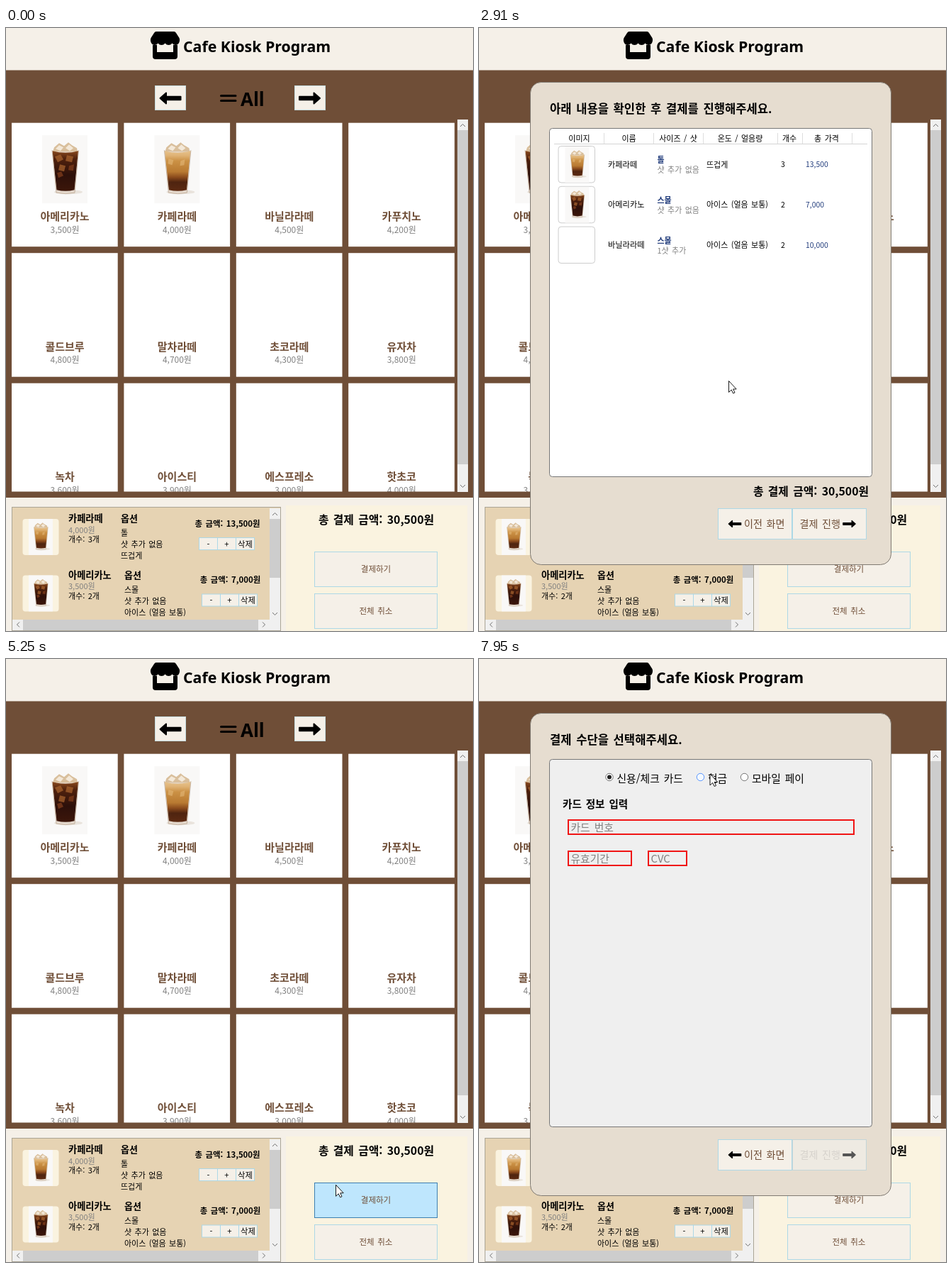
Write an HTML page that moves like this. It is 659x850 px and loops after 8 s.

```html
<!DOCTYPE html>
<html lang="ko">
<head>
<meta charset="utf-8">
<title>Cafe Kiosk Program</title>
<style>
html, body { margin: 0; width: 100%; height: 100%; overflow: hidden; background: #f5f0e8; }
svg { display: block; }
text { font-family: 'Noto Sans CJK KR', 'Noto Sans CJK', sans-serif; word-spacing: .12em; white-space: pre; }
.latin { font-family: 'Noto Sans', 'Open Sans', sans-serif; word-spacing: 0; }
.b { font-weight: 700; }
.m { text-anchor: middle; }
.e { text-anchor: end; }
.brown { fill: #6f4e37; }
.gray { fill: #808080; }
.navy { fill: #1f3a7a; }
.btn rect { fill: #f5f0e8; stroke: #add8e6; }
.btn.hot rect { fill: #bee6fd; stroke: #3c7fb1; }
.btn.down rect { fill: #c4e5f6; stroke: #2c628b; }
.btn.off rect { fill: #eeeae2; stroke: #c3d5d8; }
.btn.off text { fill: #d6d2cc; }
.btn.off path { fill: #555; stroke: #555; }
.radio circle { fill: #fff; stroke: #707070; }
.radio.hot circle { fill: #f3f9ff; stroke: #5593ff; }
.field { fill: none; stroke: #f01414; stroke-width: 2; }
</style>
</head>
<body>
<svg id="stage" width="659" height="850" viewBox="0 0 659 850"></svg>
<script>
const box = (x, y, w, h, fill, more = '') =>
  `<rect x="${x}" y="${y}" width="${w}" height="${h}" fill="${fill}" ${more}/>`;

// y is the middle of the line
const text = (x, y, size, str, cls = '') =>
  `<text x="${x}" y="${y + size * .37}" font-size="${size}" class="${cls}">${str}</text>`;

const group = (id, body, cls = '') => `<g id="${id}" class="${cls}">${body}</g>`;

// points left for s > 0, right for s < 0
const arrow = (x, y, s) => `<path transform="translate(${x} ${y}) scale(${s} ${Math.abs(s)})"
  d="M-6-2.2H14.5V2.2H-6V7.5L-14.5 0-6-7.5Z" stroke="#000" stroke-width="2" stroke-linejoin="round"/>`;

const chevron = (x, y, turn) => `<path transform="translate(${x} ${y}) rotate(${turn})"
  d="M-3.5 2L0-1.5 3.5 2" fill="none" stroke="#707070"/>`;

const drink = (kind, x, y, s = 1) => `<use href="#${kind}" transform="translate(${x} ${y}) scale(${s})"/>`;

const buttons = {
  pay: [435, 738, 174, 50],
  cancel: [435, 797, 174, 50],
  prev: [337, 677, 105, 44],
  next: [442, 677, 105, 44]
};
const button = (id, body) => {
  const [x, y, w, h] = buttons[id];
  return group(id, box(x + .5, y + .5, w - 1, h - 1, '') + body, 'btn');
};

const cup = (id, stops, extra) => `
  <linearGradient id="${id}Fill" x2="0" y2="1">${stops.map(([o, c]) =>
    `<stop offset="${o}" stop-color="${c}"/>`).join('')}</linearGradient>
  <g id="${id}">
    ${box(0, 0, 64, 96, '#f9f8f7')}
    <ellipse cx="37" cy="80" rx="20" ry="3" fill="#e9e3dc"/>
    <path d="M14 22L20 81Q33 84 46 81L51.500 22Z" fill="#e4d8cc"/>
    <path d="M15 23L17 17 24 11 31 15 37 10 42 14 49 18 50 23Z" fill="#d9bf9c"/>
    <path d="M19 19l5-5 6 3-4 5zM33 18l5-5 6 5-5 4z" fill="#f3e8d8"/>
    <path d="M14.500 22Q33 27 51 22L45.500 77Q33 80 20.500 77Z" fill="url(#${id}Fill)"/>
    ${extra}
    <path d="M14 21L20 81Q33 84 46 81L51.500 21" fill="none" stroke="#b9a48f" stroke-width=".7"/>
  </g>`;

const defs = `<defs>
  ${cup('americano', [[0, '#8a4a1e'], [.2, '#4f210d'], [.6, '#2d100a'], [1, '#3c160a']],
    `<path d="M18 30l8-3 4 7-8 4zM35 28l9 2-2 8-9-2zM25 41l8 2-2 8-8-2z" fill="#a5622e" opacity=".75"/>
     <path d="M38 43l7-2-1 9-7-1zM21 53l6-2 3 6-7 3z" fill="#7a3a1a" opacity=".8"/>`)}
  ${cup('latte', [[0, '#e6c28c'], [.12, '#dfb274'], [.25, '#cb9145'], [.52, '#b97a32'], [.66, '#8a4a1c'], [.78, '#4f2410'], [1, '#5c2a12']],
    `<path d="M20 33l7 2-2 7-6-2zM37 36l6-2-1 8-6 1z" fill="#e3b878" opacity=".6"/>`)}
</defs>`;

const menu = [
  ['아메리카노', '3,500'], ['카페라떼', '4,000'], ['바닐라라떼', '4,500'], ['카푸치노', '4,200'],
  ['콜드브루', '4,800'], ['말차라떼', '4,700'], ['초코라떼', '4,300'], ['유자차', '3,800'],
  ['녹차', '3,600'], ['아이스티', '3,900'], ['에스프레소', '3,000'], ['핫초코', '4,000']
];
const card = ([name, price], i) => {
  const x = 8 + i % 4 * 158.4, y = 133.7 + Math.floor(i / 4) * 183.5;
  return box(x, y, 149.7, 174.5, '#fff') +
    (i < 2 ? drink(['americano', 'latte'][i], x + 43, y + 17.5) : '') +
    text(x + 75, y + 132, 15, name, 'b m brown') +
    text(x + 75, y + 150.5, 12, price + '원', 'm gray');
};

const cartItem = (y, kind, name, price, count, optX, options, total, btnX) =>
  box(23.5, y, 51, 51, '#faf3e0', 'rx="4"') + drink(kind, 32, y, .53) +
  text(88, y - .5, 13.2, name, 'b') +
  text(88, y + 15.5, 11, price + '원', 'gray') +
  text(88, y + 29, 11, `개수: ${count}개`) +
  text(optX, y - .5, 13, '옵션', 'b') +
  options.map((o, i) => text(optX, y + 20 + i * 16, 11, o)).join('') +
  text(btnX + 40.5, y + 6.5, 11.4, `총 금액: ${total}원`, 'b m') +
  ['-', '+', '삭제'].map((s, i) =>
    box(btnX + .5 + i * 26, y + 26.5, 26, 17, '#f5f0e8', 'stroke="#add8e6"') +
    text(btnX + 13.5 + i * 26, y + 35.5, 11.3, s, 'm')).join('');

const store = `<path d="M212 5H237Q239 5 240 7L244.5 14C246.5 19 243 24 239.5 24Q236.5 24 234.5 21.5
  Q232.5 24 229.5 24 226.5 24 224.5 21.5 222.5 24 219.5 24 216.5 24 214.5 21.5 212.5 24 209.5 24
  C206 24 202.5 19 204.5 14L209 7Q210 5 212 5Z"/>
  <path d="M207 24H213V34H236V24H242V40Q242 44 238 44H211Q207 44 207 40Z"/>`;

const totalText = '총 결제 금액: 30,500원';

const shop =
  box(0, 0, 659, 850, '#f5f0e8') + store +
  text(250, 26.5, 21.3, 'Cafe Kiosk Program', 'b latin') +
  box(0, 59.5, 659, 603, '#6f4e37') +
  [210, 407].map(x => box(x + .5, 81.5, 43, 34, '#f5f0e8', 'stroke="#c5dcdf"')).join('') +
  arrow(232, 99, 1) + arrow(428.5, 99, -1) +
  '<path d="M303.5 95.5H324M303.5 102.5H324" stroke="#000" stroke-width="3" stroke-linecap="round"/>' +
  text(331, 100, 26, 'All', 'b latin') +
  menu.map(card).join('') +
  box(0, 653.5, 659, 8.5, '#6f4e37') + box(0, 662, 659, 188, '#f5f0e8') +
  box(637, 129, 15, 525, '#f0f0f0') + box(637, 144, 15, 471, '#cdcdcd') +
  chevron(644.5, 137, 0) + chevron(644.5, 646, 180);

const cart =
  box(8.5, 675.5, 379, 174, '#e6d3b3', 'stroke="#aba596"') +
  cartItem(692, 'latte', '카페라떼', '4,000', 3, 162, ['톨', '샷 추가 없음', '뜨겁게'], '13,500', 272) +
  cartItem(771.5, 'americano', '아메리카노', '3,500', 2, 167,
    ['스몰', '샷 추가 없음', '아이스 (얼음 보통)'], '7,000', 276) +
  box(372, 677, 15, 172, '#f0f0f0') + box(372, 692, 15, 83, '#cdcdcd') +
  box(9, 834, 378, 15, '#f0f0f0') + box(24, 834, 332, 15, '#cdcdcd') +
  chevron(379.5, 685, 0) + chevron(379.5, 826, 180) + chevron(17, 841, -90) + chevron(364, 841, 90);

const payment =
  box(395, 673, 256, 177, '#faf3e0') +
  text(522.5, 693.5, 15.8, totalText, 'b m') +
  button('pay', text(522, 763, 11.5, '결제하기', 'm brown')) +
  button('cancel', text(522, 822, 11.5, '전체 취소', 'm brown'));

const columns = [['이미지', 141.5, 176], ['이름', 211.5, 246], ['사이즈 / 샷', 281, 316],
  ['온도 / 얼음량', 368.5, 421], ['개수', 438, 456], ['총 가격', 490.5, 526]];
const orders = [
  ['latte', '카페라떼', '톨', '샷 추가 없음', '뜨겁게', 3, '13,500'],
  ['americano', '아메리카노', '스몰', '샷 추가 없음', '아이스 (얼음 보통)', 2, '7,000'],
  ['', '바닐라라떼', '스몰', '1샷 추가', '아이스 (얼음 보통)', 2, '10,000']
];
const order = ([kind, name, size, shot, heat, count, price], i) => {
  const y = 166.5 + i * 56.8;
  return box(112, y, 51.5, 51.5, '#fff', 'rx="4" stroke="#ccc"') +
    (kind && drink(kind, 121.5, y + .5, .53)) +
    text(182, y + 26, 11.2, name) +
    text(251.5, y + 19.5, 11, size, 'b navy') +
    text(251.5, y + 33.5, 11, shot, 'gray') +
    text(321, y + 26, 11, heat) +
    text(426, y + 26, 10.5, count) +
    text(461, y + 26, 10.4, price, 'navy');
};

const panel = (h, fill) => box(99.5, 141.5, 455, h, fill, 'rx="4" stroke="#777"');

const review =
  text(100, 114, 16.6, '아래 내용을 확인한 후 결제를 진행해주세요.', 'b') +
  panel(491, '#fff') +
  '<path d="M106 163.5H548" stroke="#d5d5d5"/>' +
  columns.map(([name, x, edge]) => text(x, 156, 11, name, 'm') +
    `<path d="M${edge + .5} 148V163" stroke="#ddd"/>`).join('') +
  orders.map(order).join('') +
  text(550, 653.5, 15.8, totalText, 'b e');

const radio = (id, x, label) =>
  group(id, `<circle cx="${x}" cy="166.5" r="5.2"/>` + text(x + 10.5, 168.5, 14.8, label), 'radio');
const field = (x, y, w, label) =>
  box(x, y, w, 20, '', 'class="field"') + text(x + 3.5, y + 10.5, 14.8, label, 'gray');

const method =
  text(100, 114, 16.6, '결제 수단을 선택해주세요.', 'b') +
  panel(518, '#efefef') +
  radio('card', 184, '신용/체크 카드') + radio('cash', 312.5, '현금') + radio('mobile', 374.5, '모바일 페이') +
  group('form', '<circle cx="184" cy="166.5" r="3" fill="#212121"/>' +
    text(118, 205, 14.6, '카드 정보 입력', 'b') +
    field(126, 227, 403, '카드 번호') + field(126, 271, 89, '유효기간') + field(239, 271, 54, 'CVC'));

const dialog =
  box(72.5, 76.5, 509, 680, '#e6ddd0', 'rx="15" stroke="#807a72"') +
  group('review', review) + group('method', method) +
  button('prev', arrow(361, 699, .6) + text(374, 699, 14.1, '이전 화면', 'brown')) +
  button('next', text(452.5, 699, 14.1, '결제 진행', 'brown') + arrow(522.5, 699, -.6));

const $ = id => document.getElementById(id);
$('stage').innerHTML = defs + shop + cart + payment + group('dialog', dialog) +
  group('pointer', '<circle id="spot" cx="-1" cy="-1" r="9.5" fill="#f0e614" opacity=".7"/>' +
    '<path d="M.5.5V16.5L4.2 13 6.6 18 9 17 6.7 12H11.2Z" fill="#fff" stroke="#000" stroke-width=".9"/>');

// pointer way: time, x, y
const way = [
  [0, 700, 900], [120, 632, 838], [450, 490, 702], [520, 490, 702], [650, 476, 701],
  [910, 476, 701], [1050, 476, 696], [1250, 476, 696], [1670, 491, 738], [1880, 497, 763],
  [2080, 493, 762], [2340, 493, 762], [2550, 425, 730], [2910, 352, 497], [3040, 352, 497],
  [3240, 353, 501], [3370, 353, 501], [3860, 489, 694], [4380, 489, 694], [4730, 414, 698],
  [5040, 414, 698], [5320, 482, 755], [5460, 482, 755], [5670, 474, 740], [5880, 478, 698],
  [5940, 478, 698], [6150, 493, 701], [6500, 492, 698], [6890, 492, 698], [7170, 360, 400],
  [7380, 200, 117], [7590, 184, 161], [7730, 184, 161], [7950, 325.5, 161.5], [8000, 325.5, 161.5]
];
const clicks = [[1880, 1950], [4780, 4840], [5390, 5460], [6230, 6300], [7590, 7660]];
const TICK = 70; // the pointer advances in small jumps

function pointerAt(t) {
  const i = way.findIndex(p => p[0] > t) - 1;
  const [t0, x0, y0] = way[i], [t1, x1, y1] = way[i + 1];
  const k = Math.floor((t - t0) / TICK) * TICK / (t1 - t0);
  return [x0 + (x1 - x0) * k, y0 + (y1 - y0) * k];
}

const radios = { card: [178, 160, 111, 18], cash: [306, 160, 45, 18], mobile: [368, 160, 92, 18] };
const show = (id, on) => $(id).style.display = on ? '' : 'none';

function draw(t) {
  const [px, py] = pointerAt(t);
  const over = ([x, y, w, h]) => px > x && px < x + w && py > y + 1 && py < y + h;
  const pressed = clicks.some(([a, b]) => t >= a && t < b);
  const open = t >= 1950 && t < 4840 || t >= 5460;
  const paying = t >= 6300;

  show('dialog', open);
  show('review', !paying);
  show('method', paying);
  show('form', t >= 7660);
  show('spot', pressed);
  $('pointer').setAttribute('transform', `translate(${px} ${py})`);

  for (const id in buttons) {
    const inDialog = id === 'prev' || id === 'next';
    const hot = open === inDialog && over(buttons[id]);
    const state = id === 'next' && paying ? 'off' : hot ? pressed ? 'down' : 'hot' : '';
    $(id).setAttribute('class', 'btn ' + state);
  }
  for (const id in radios) $(id).setAttribute('class', over(radios[id]) ? 'radio hot' : 'radio');
}

const start = performance.now();
function loop() {
  draw((performance.now() - start) % 8000);
  requestAnimationFrame(loop);
}
loop();
</script>
</body>
</html>
```
